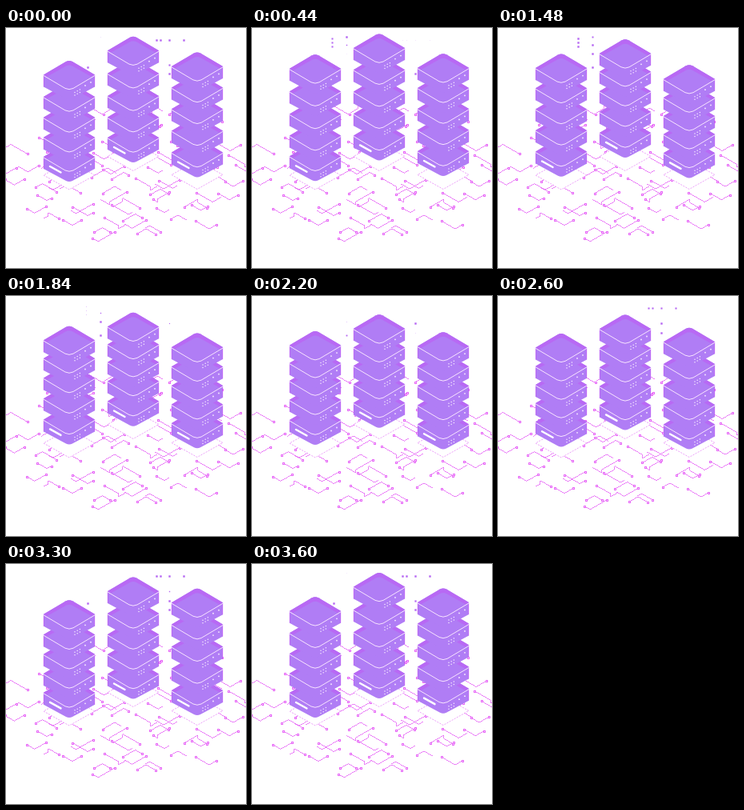
Write an HTML page that moves like this. It is 300 px wide and 300 px high and loops after 3620 ms.

```html
<!DOCTYPE html>
<html lang="en">
<head>
<meta charset="utf-8">
<title>Server stacks</title>
<style>
  html, body { margin: 0; width: 100%; height: 100%; overflow: hidden; background: #fff; }
  svg { display: block; width: 100vw; height: 100vh; }
  .trace, .pad { stroke: #e766f7; stroke-width: .8; shape-rendering: crispEdges; }
  .trace { fill: none; }
  .pad { fill: #fff; stroke-width: 1; }
  .base { fill: #fff; stroke: #e687f8; stroke-width: .8; stroke-dasharray: 2 1.5; }
  .body, .inset { fill: #b07df5; }
  .lid { fill: #b869f4; }
  .rim { fill: none; stroke: #f6e6ff; stroke-width: 1; }
  .side { fill: none; stroke: #c163f5; stroke-width: .8; }
  .light { fill: #f8edff; }
  .slot { stroke: #fff; stroke-width: 2.4; stroke-linecap: round; }
  .spark { fill: #b565f3; }
</style>
</head>
<body>
<svg id="stage" viewBox="0 0 300 300"></svg>
<script>
const LOOP = 3620, HALF = LOOP / 2;
const SLOPE = 0.57;
const stage = document.getElementById('stage');

function add(parent, tag, attrs) {
  const el = document.createElementNS('http://www.w3.org/2000/svg', tag);
  for (const key in attrs) el.setAttribute(key, attrs[key]);
  parent.appendChild(el);
  return el;
}
const path = (parent, cls, d) => add(parent, 'path', { class: cls, d });
const dot = (parent, cx, cy, r) => add(parent, 'circle', { class: 'light', cx, cy, r });

function randomizer(seed) {
  return () => (seed = seed * 16807 % 2147483647) / 2147483647;
}

// Eased swing between 1 (at peak) and -1 (half a loop later).
function swing(t, peak) {
  const phase = (((t - peak) % LOOP) + LOOP) % LOOP / HALF;
  const p = phase > 1 ? 2 - phase : phase;
  const ease = q => Math.pow(2 * q, 2.5) / 2;
  return 1 - 2 * (p < 0.5 ? ease(p) : 1 - ease(1 - p));
}

// Circuit board: bent isometric traces scattered over an oval floor.
function drawPad(x, y) {
  path(stage, 'pad', `M${Math.round(x) - .5},${Math.round(y) - .5}h2v2h-2z`);
}

function drawTrace(x, y, rnd) {
  const dir = rnd() < 0.5 ? -1 : 1;
  const tilt = (rnd() < 0.5 ? -1 : 1) * SLOPE;
  const first = 8 + 14 * rnd(), second = 5 + 8 * rnd();
  const bend = rnd() < 0.4 ? 4 : 0;
  const x1 = x + dir * first, y1 = y + tilt * first;
  const x2 = x1 + dir * second, y2 = y1 + bend - tilt * second;
  path(stage, 'trace', `M${x},${y}L${x1},${y1}v${bend}L${x2},${y2}`);
  drawPad(x, y);
  if (rnd() < 0.6) drawPad(x2, y2);
}

function drawBoard() {
  const rnd = randomizer(4217);
  for (let row = 0; row < 10; row++) {
    for (let col = 0; col < 11; col++) {
      const x = 6 + 28 * (col + row % 2 / 2) + 8 * rnd();
      const y = 104 + 16.5 * row + 6 * rnd();
      if (Math.hypot((x - 148) / 146, (y - 180) / 80) < 1) drawTrace(x, y, rnd);
    }
  }
}

// One server, with its back corner at the origin.
function makeBox(withSlot) {
  const g = add(stage, 'g', {});
  path(g, 'body', 'M-32,17.5L-4,1Q0,-1 4,1L32,17.5V32.5L4,47.6Q0,49.6 -4,47.6L-32,32.5Z');
  path(g, 'lid', 'M-32,17.5L-4,1Q0,-1 4,1L32,17.5L5,34.5Q0,37.5 -5,34.5Z');
  path(g, 'inset', 'M-28,20L-4,6.5Q0,4.5 4,6.5L28,20L5,34Q0,37 -5,34Z');
  path(g, 'side', 'M-31.7,18V32.5M31.7,18V32.5');
  path(g, 'rim', 'M-32,18.5L-5,34.5Q0,37 5,34.5L32,18.5');
  for (let row = 0; row < 2; row++)
    for (let col = 0; col < 3; col++)
      dot(g, 7 + 3.2 * col, 39.5 - 1.7 * col + 3.5 * row, .75);
  dot(g, 20, 31, .9);
  dot(g, 27, 27, .9);
  if (withSlot) path(g, 'slot', 'M-24,29.5L-10.5,37');
  return g;
}

const BOXES = 5, STEP = 25.3, LEAD = 185;
const stacks = [
  { x: 79, top: 39, peak: 3550 },
  { x: 159, top: 15.5, peak: 3180 },
  { x: 239, top: 38.5, peak: 2490 }
];

function makeStack({ x, top, peak }) {
  const tip = top + 163;
  path(stage, 'base', `M${x - 32},${tip - 18}L${x},${tip}L${x + 32},${tip - 18}L${x},${tip - 36}Z`);
  return Array.from({ length: BOXES }, (_, i) => ({
    el: makeBox(i === 0),
    x,
    y: top + STEP * (BOXES - 1 - i),
    amp: 3.3 + 1.2 * i,
    peak: peak - LEAD * i
  }));
}

// Sparks come in rows or columns that glow one after another.
const line = (xs, ys, peak, lag = 0) =>
  xs.flatMap(x => ys.map(y => [x, y])).map(([x, y], i) => ({
    el: path(stage, 'spark', 'M-.5,-.5h1v1h-1z'), x, y, peak: peak + lag * i
  }));

drawBoard();
const boxes = stacks.flatMap(makeStack);
const sparks = [
  line([100], [13, 18, 23], 1000),
  line([118], [11, 21, 32, 49], 900, 230),
  line([102], [49], 3560),
  line([188, 193, 204, 222], [15], 3150),
  line([204], [34, 46, 57], 2600, 480)
].flat();

function draw(t) {
  for (const b of boxes)
    b.el.setAttribute('transform', `translate(${b.x},${(b.y + b.amp * swing(t, b.peak)).toFixed(2)})`);
  for (const s of sparks) {
    const glow = .15 + 1.25 * Math.cos((t - s.peak) / HALF * Math.PI);
    const size = 2.4 * Math.min(1, Math.max(0, glow));
    s.el.setAttribute('transform', `translate(${s.x + .5},${s.y + .5}) scale(${size.toFixed(3)})`);
  }
}

const start = performance.now();
function tick(now) {
  draw(Math.max(0, now - start) % LOOP);
  requestAnimationFrame(tick);
}
draw(0);
requestAnimationFrame(tick);
</script>
</body>
</html>
```
